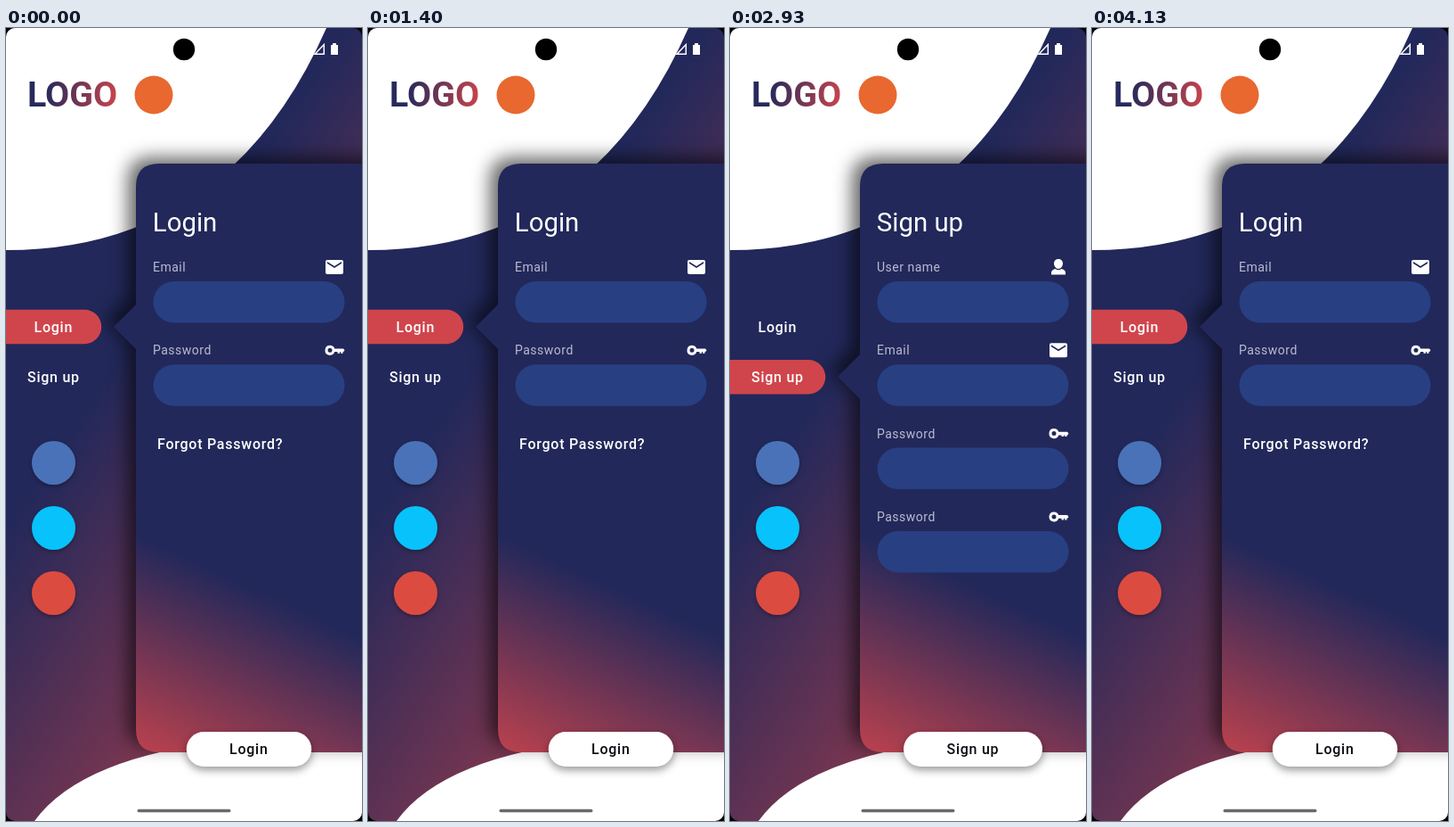
Write an HTML page that moves like this. It is 400x889 px and loops after 4.2 s.

```html
<!DOCTYPE html>
<html lang="en">
<head>
<meta charset="utf-8">
<title>Login and sign up</title>
<style>
  html, body { margin: 0; width: 100%; height: 100%; overflow: hidden; background: #000; }
  svg { display: block; width: 400px; height: 889px; border-radius: 10px; }
  text { font-family: Roboto, Arial, sans-serif; fill: #fff; }
  .title { font-size: 29.4px; }
  .label { font-size: 14px; letter-spacing: .5px; fill: #babbd0; }
  .action { font-size: 16px; font-weight: 500; letter-spacing: .75px; }
  .dark { fill: #0b0b12; }
  .logo { font-size: 39.3px; font-weight: 700; fill: url(#logoFill); }
  .panel { fill: url(#panelFill); filter: drop-shadow(-9px -7px 10px rgba(0, 0, 0, .6)); }
  .button { fill: #fff; filter: drop-shadow(0 4px 5px rgba(0, 0, 0, .4)); }
  .social { filter: drop-shadow(0 2px 2px rgba(0, 0, 0, .3)); }
  .icon { fill: #fff; fill-rule: evenodd; }
</style>
</head>
<body>
<svg id="stage" viewBox="0 0 400 889">
  <defs>
    <linearGradient id="backFill" gradientUnits="userSpaceOnUse" x1="260" y1="177" x2="488" y2="332">
      <stop stop-color="#22285a"/><stop offset="1" stop-color="#7a3650"/>
    </linearGradient>
    <linearGradient id="panelFill" gradientUnits="userSpaceOnUse" x1="-190" y1="413" x2="-292" y2="635">
      <stop stop-color="#22285a"/><stop offset="1" stop-color="#cb444c"/>
    </linearGradient>
    <linearGradient id="logoFill" gradientUnits="userSpaceOnUse" x1="25" y1="70" x2="125" y2="80">
      <stop offset=".2" stop-color="#272a5b"/><stop offset="1" stop-color="#c9444d"/>
    </linearGradient>
  </defs>
  <rect width="400" height="889" fill="url(#backFill)"/>
  <path d="M0 0H360Q250 249 0 249Z" fill="#fff"/>
  <path d="M32 889Q105 789 400 793V889Z" fill="#fff"/>
  <text class="logo" x="24" y="88">LOGO</text>
  <circle cx="166" cy="75" r="21.5" fill="#e8682f"/>
  <g id="cards"></g>
  <g id="menu"></g>
  <text class="action" x="31.5" y="341">Login</text>
  <text class="action" x="24" y="397">Sign up</text>
  <g class="social">
    <circle cx="53.5" cy="487.5" r="24.5" fill="#4a72b8"/>
    <circle cx="53.5" cy="560.5" r="24.5" fill="#08c2fb"/>
    <circle cx="53.5" cy="633.5" r="24.5" fill="#dc4b40"/>
  </g>
  <circle cx="200" cy="24" r="12.2"/>
  <path d="M347 29.3H357.3V18.5Z" fill="none" stroke="#fff" stroke-width="1.5"/>
  <path d="M365 19H367V17H371V19H373V30H365Z" fill="#fff"/>
  <rect x="147.5" y="875.8" width="105" height="3.4" rx="1.7" fill="#6a686d"/>
</svg>
<script>
const LOOP = 4200, SLIDE = 308, SWITCH_MS = 550, PILL_MS = 160;
const TO_SIGNUP = 1744, TO_LOGIN = 2975;

const icons = {
  mail: 'M20 4H4c-1.1 0-2 .9-2 2v12c0 1.1.9 2 2 2h16c1.1 0 2-.9 2-2V6c0-1.1-.9-2-2-2zm0 4l-8 5-8-5V6l8 5 8-5v2z',
  key: 'M7 6.5a5.5 5.5 0 1 0 5.2 7.3H15.5V15.5H18V13.8H19V15.5H21.5V13.8H22.2L23.5 12 22 10.2H12.2A5.5 5.5 0 0 0 7 6.5ZM7 9.5a2.5 2.5 0 1 1 0 5a2.5 2.5 0 1 1 0-5Z',
  user: 'M12 3c-3.2 0-5 2.3-5 5s2 6 5 6 5-3.3 5-6-1.8-5-5-5zM8.5 14C5.5 15 4 16 4 18.5V20.5H20V18.5C20 16 18.5 15 15.5 14Q12 16.5 8.5 14z'
};

const cards = document.getElementById('cards');
const menu = document.getElementById('menu');

function group(parent, markup) {
  const g = document.createElementNS('http://www.w3.org/2000/svg', 'g');
  g.innerHTML = markup;
  return parent.appendChild(g);
}

function field([label, icon], i) {
  const y = 284 + i * 93.3;
  return `<text class="label" x="165" y="${y - 11}">${label}</text>
    <path class="icon" transform="translate(357 ${y - 28})" d="${icons[icon]}"/>
    <rect x="165.5" y="${y}" width="215" height="46.5" rx="23.25" fill="#283f82"/>`;
}

function card(title, tipY, fields, buttonWidth, textX, extra = '') {
  return group(cards, `
    <path class="panel" d="M425 152H172Q146 152 146 178V${tipY - 25}L121 ${tipY}L146 ${tipY + 25}V786Q146 812 172 812H425Z"/>
    <text class="title" x="164.8" y="228">${title}</text>
    ${fields.map(field).join('')}${extra}
    <rect class="button" x="${273 - buttonWidth / 2}" y="789" width="${buttonWidth}" height="39" rx="19.5"/>
    <text class="action dark" x="${textX}" y="814">${title}</text>`);
}

function pill(y) {
  const shape = `d="M-20 ${y}H88a19.25 19.25 0 0 1 0 38.5H-20Z"`;
  return group(menu, `<path ${shape} fill="#d0454c"/><path ${shape} fill="#fff" opacity="0"/>`);
}

const login = card('Login', 335, [['Email', 'mail'], ['Password', 'key']], 140.5, 251,
  '<text class="action" x="170" y="472">Forgot Password?</text>');
const signup = card('Sign up', 391,
  [['User name', 'user'], ['Email', 'mail'], ['Password', 'key'], ['Password', 'key']], 156, 243.5);
const loginPill = pill(315.7);
const signupPill = pill(372);

const clamp = v => Math.min(1, Math.max(0, v));
const easeOut = v => 1 - (1 - v) ** 3;

function placeCard(el, p) {
  el.setAttribute('opacity', p);
  el.setAttribute('visibility', p > 0 ? 'visible' : 'hidden');
  el.setAttribute('transform', `translate(${SLIDE * (1 - easeOut(p))} 0)`);
}

function placePill(el, shown, glow) {
  el.setAttribute('transform', `translate(${-107.5 * (1 - shown)} 0)`);
  el.lastChild.setAttribute('opacity', glow);
}

function draw(now) {
  const t = now % LOOP;
  const ramp = (start, ms) => clamp((t - start) / ms);
  // Tap highlight on the newly chosen menu item
  const glow = start => t < start ? 0 : .11 * (1 - ramp(start + 280, 200));

  const p = ramp(TO_SIGNUP, SWITCH_MS) - ramp(TO_LOGIN, SWITCH_MS);
  const top = t >= TO_SIGNUP && t < TO_LOGIN ? signup : login;
  if (cards.lastChild !== top) cards.append(top);
  placeCard(login, 1 - p);
  placeCard(signup, p);

  const k = easeOut(ramp(TO_SIGNUP, PILL_MS)) - easeOut(ramp(TO_LOGIN, PILL_MS));
  placePill(loginPill, 1 - k, glow(TO_LOGIN));
  placePill(signupPill, k, glow(TO_SIGNUP));
}

const begin = performance.now();
function tick() {
  draw(performance.now() - begin);
  requestAnimationFrame(tick);
}
tick();
</script>
</body>
</html>
```
